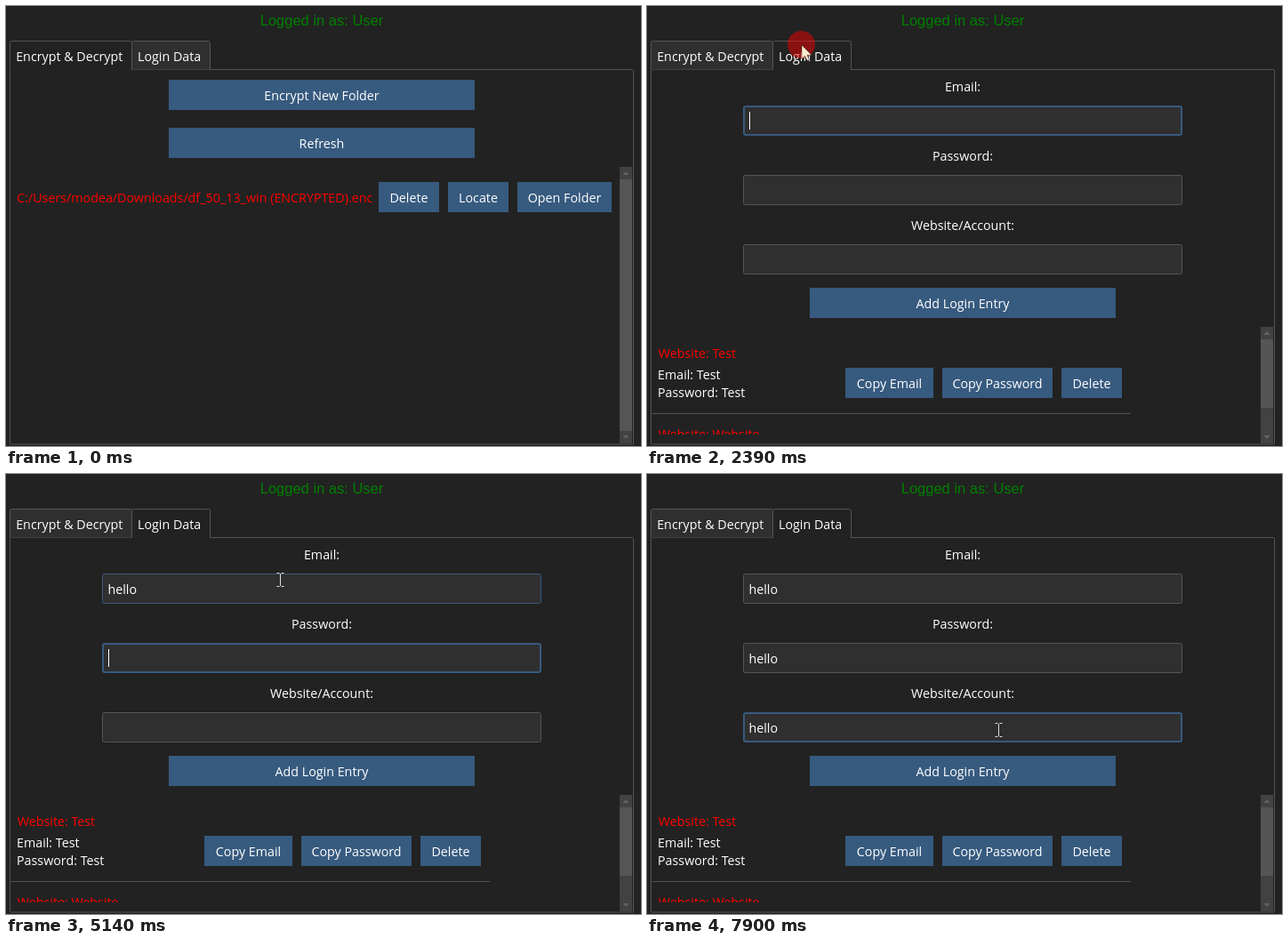
These frames come from a looping animation (714x495 px, 7.99 s). An HTML page:

```html
<!DOCTYPE html>
<html lang="en">
<head>
<meta charset="utf-8">
<title>Folder encryption app</title>
<style>
  html, body { margin: 0; width: 100%; height: 100%; overflow: hidden; background: #222; }
  svg { display: block; width: 714px; height: 495px; }
  text { font: 14.27px "Open Sans", "Noto Sans", sans-serif; fill: #fff; white-space: pre; }
  .mid { text-anchor: middle; }
  .red { fill: #f00; }
  .user { font: 16.5px "Liberation Sans", Arial, sans-serif; fill: #008000; }
</style>
</head>
<body>
<svg id="stage" viewBox="0 0 714 495" xmlns="http://www.w3.org/2000/svg"></svg>
<script>
const LOOP = 7990, STEP = 83.3;
const BG = '#222222', BLUE = '#375a7f', LINE = '#555555', INPUT = '#2f2f2f';
const stage = document.getElementById('stage');

function add(parent, tag, attrs, content) {
  const el = document.createElementNS('http://www.w3.org/2000/svg', tag);
  for (const k in attrs) el.setAttribute(k, attrs[k]);
  if (content) el.textContent = content;
  parent.appendChild(el);
  return el;
}
const set = (el, attrs) => { for (const k in attrs) el.setAttribute(k, attrs[k]); };
const show = (el, on) => el.setAttribute('visibility', on ? 'visible' : 'hidden');
const group = () => add(stage, 'g', {});
const rect = (g, x, y, width, height, fill) => add(g, 'rect', { x, y, width, height, fill });
const path = (g, d, fill = 'none', stroke = LINE) => add(g, 'path', { d, fill, stroke });
const label = (g, x, y, str, cls = '') => add(g, 'text', { x, y, class: cls }, str);

function button(g, x, y, w, str) {
  rect(g, x, y, w, 34, BLUE);
  label(g, x + w / 2, y + 23, str, 'mid');
}

function scrollbar(g, top, thumbEnd) {
  rect(g, 690, top, 14, 492 - top, '#424242');
  rect(g, 690, top + 14, 14, thumbEnd - top - 14, LINE);
  path(g, `M693.5 ${top + 9}l3.5 -4 3.5 4z`, '#626262', 'none');
  path(g, 'M693.5 483l3.5 4 3.5 -4z', '#626262', 'none');
}

// Window frame
rect(stage, 0, 0, 714, 495, BG);
label(stage, 355, 22, 'Logged in as: User', 'user mid');
add(stage, 'rect', { x: 4.5, y: 71.5, width: 701, height: 421.5, rx: 1, fill: 'none', stroke: LINE });

const tabs = [[4.5, 141.5], [141.5, 229.5]].map(([l, r]) => ({
  l, r,
  shape: path(stage, `M${l} 71.5V41.5q0 -2 2 -2H${r - 2}q2 0 2 2V71.5`),
  gap: rect(stage, l + .5, 71, r - l - 1, 1, BG)
}));
label(stage, 11.2, 62, 'Encrypt & Decrypt');
label(stage, 148, 62, 'Login Data');

// Folder page
const folders = group();
button(folders, 183, 83, 344, 'Encrypt New Folder');
button(folders, 183, 137, 344, 'Refresh');
label(folders, 12.2, 221, 'C:/Users/modea/Downloads/df_50_13_win (ENCRYPTED).enc', 'red');
button(folders, 419, 198, 68, 'Delete');
button(folders, 497, 198, 68, 'Locate');
button(folders, 575, 198, 106, 'Open Folder');
scrollbar(folders, 181, 478);
const focusRing = add(folders, 'rect', {
  x: 185.5, y: 85.5, width: 339, height: 29, fill: 'none', stroke: '#fff', 'stroke-dasharray': '3 2'
});

// Login page
const logins = group();
const fields = ['Email:', 'Password:', 'Website/Account:'].map((name, i) => {
  const y = 112 + 78 * i;
  label(logins, 355, y - 16, name, 'mid');
  return {
    y,
    box: add(logins, 'rect', { rx: 2, fill: INPUT }),
    text: label(logins, 114.5, y + 23, '')
  };
});
const caret = rect(logins, 115, 119, 1, 20, '#fff');
button(logins, 183, 317, 344, 'Add Login Entry');
label(logins, 12.8, 396, 'Website: Test', 'red');
label(logins, 12, 420, 'Email: Test');
label(logins, 12, 440, 'Password: Test');
button(logins, 223, 407, 99, 'Copy Email');
button(logins, 332, 407, 124, 'Copy Password');
button(logins, 466, 407, 68, 'Delete');
rect(logins, 6, 458, 538, 1, LINE);
label(logins, 12.8, 487, 'Website: Website', 'red');
rect(logins, 6, 482, 680, 10, BG);
scrollbar(logins, 361, 452);

// Pointer
const click = add(stage, 'circle', { r: 15.5, fill: '#f00000', 'fill-opacity': .5 });
const arrow = path(stage, 'M0 0V15.6l3.6 -3.4 2.4 5.3 2.5 -1.1 -2.4 -5.2h5z', '#feeccd', '#222');
arrow.setAttribute('stroke-width', .5);
const beam = path(stage, 'M-3.5 -7.5h3m2 0h3M.5 -7V7M-3.5 7.5h3m2 0h3', 'none', '#dcdcdc');

// Pointer moves: start, end, then four Bezier points
const moves = [
  [70, 820, [644, 461], [520, 250], [300, 190], [254, 278]],
  [1397, 2060, [254, 278], [450, 260], [480, 60], [174, 44]],
  [2727, 3550, [174, 44], [200, 270], [320, 310], [272, 135]],
  [3550, 3710, [272, 135], [284, 130], [296, 124], [308, 119]],
  [7567, 7900, [308, 119], [335, 170], [370, 240], [395, 288]]
];

// Moments at which each field gains a letter of the word
const word = 'hello';
const typed = [
  [4540, 4540, 4720, 4890, 5050],
  [5560, 5640, 5800, 5970, 6140],
  [6560, 6650, 6820, 6980, 7150]
];
const focusAt = [2390, 5140, 6310];
const caretOff = [[2970, 3290], [3880, 4210], [4800, 5140], [5720, 6060], [6900, 7150], [7740, LOOP]];
const clicks = [[1230, 1310], [2390, 2470]];
const within = (t, spans) => spans.some(([a, b]) => t >= a && t < b);

function pointerAt(t) {
  const now = 70 + Math.floor((t - 55) / STEP) * STEP;
  const [a, b, ...p] = moves.filter(m => now >= m[0] - 2).pop() || moves[0];
  const k = Math.min(1, Math.max(0, (now - a + 1) / (b - a)));
  const u = k * k * (3 - 2 * k), v = 1 - u;
  return [0, 1].map(i => Math.round(
    v * v * v * p[0][i] + 3 * v * v * u * p[1][i] + 3 * v * u * u * p[2][i] + u * u * u * p[3][i]));
}

function draw(t) {
  const login = t >= focusAt[0];
  const [x, y] = pointerAt(t);
  const over = f => login && x >= 108 && x < 602 && y >= f.y && y < f.y + 34;

  folders.setAttribute('display', login ? 'none' : 'inline');
  logins.setAttribute('display', login ? 'inline' : 'none');
  tabs.forEach((tab, i) => {
    const active = login === (i === 1);
    tab.shape.setAttribute('fill', active ? BG : INPUT);
    show(tab.gap, active);
  });
  show(focusRing, t >= 1230);

  const current = focusAt.filter(s => t >= s).length - 1;
  fields.forEach((f, i) => {
    const w = i === current ? 2 : 1;
    const lit = i === current || (t > 3700 && over(f));
    set(f.box, {
      x: 108 + w / 2, y: f.y + w / 2, width: 494 - w, height: 34 - w,
      'stroke-width': w, stroke: lit ? BLUE : LINE
    });
    f.text.textContent = word.slice(0, typed[i].filter(s => t >= s).length);
  });

  const blink = login && !within(t, caretOff);
  caret.setAttribute('display', blink ? 'inline' : 'none');
  if (blink) {
    const f = fields[current];
    const w = f.text.textContent ? f.text.getComputedTextLength() : 0;
    set(caret, { x: Math.round(114.6 + w), y: f.y + 7 });
  }

  const inField = fields.some(over);
  show(arrow, t >= 70 && !inField);
  show(beam, t >= 70 && inField);
  show(click, within(t, clicks));
  set(click, { cx: x - .5, cy: y - .5 });
  arrow.setAttribute('transform', `translate(${x} ${y})`);
  beam.setAttribute('transform', `translate(${x} ${y})`);
}

const start = performance.now();
function tick() {
  draw((performance.now() - start) % LOOP);
  requestAnimationFrame(tick);
}
tick();
</script>
</body>
</html>
```
